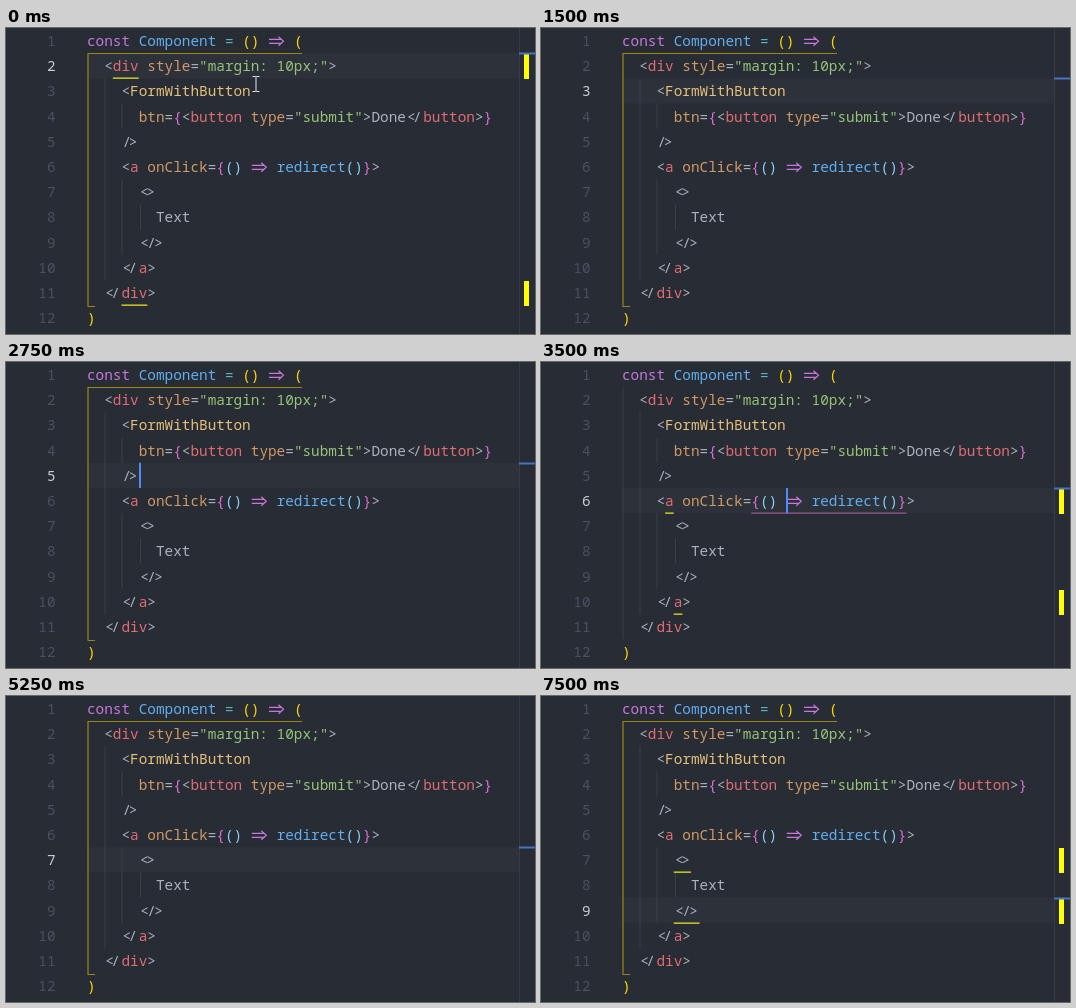
An HTML page for the animation above (8 s loop, 529 by 306 pixels).

```html
<!DOCTYPE html>
<html lang="en">
<head>
<meta charset="utf-8">
<title>Matching tags in a code editor</title>
<style>
  html, body { margin: 0; width: 100%; height: 100%; overflow: hidden; background: #282c34; }
  svg { display: block; }
  text { font-family: "Noto Sans Mono", "DejaVu Sans Mono", monospace; font-size: 14.37px; white-space: pre; }
  .num { fill: #495162; text-anchor: end; }
  .num.on { fill: #c8ccd4; }
</style>
</head>
<body>
<svg width="529" height="306" viewBox="0 0 529 306">
  <rect width="529" height="306" fill="#282c34"/>
  <g id="under"></g>
  <g id="code"></g>
  <g id="over"></g>
</svg>
<script>
const LEFT = 81, CHAR = 8.62, ROW = 25.2, LOOP = 8000;
const colX = col => LEFT + col * CHAR;
const top_ = line => (line - 1) * ROW;
const layer = id => document.getElementById(id);

const COLORS = {
  k: '#c678dd', f: '#61afef', o: '#56b6c2', t: '#e06c75', a: '#d19a66',
  s: '#98c379', c: '#e5c07b', p: '#abb2bf', 1: '#ffd700', 2: '#da70d6', 3: '#87cefa'
};

// Each line: indent, then tokens written as colour key + text.
const LINES = [
  [0, 'kconst', 'p ', 'fComponent', 'p ', 'o=', 'p ', '1()', 'p ', 'k=>', 'p ', '1('],
  [2, 'p<', 'tdiv', 'p ', 'astyle', 'p=', 's"margin: 10px;"', 'p>'],
  [4, 'p<', 'cFormWithButton'],
  [6, 'abtn', 'p=', '2{', 'p<', 'tbutton', 'p ', 'atype', 'p=', 's"submit"', 'p>',
    'pDone', 'p</', 'tbutton', 'p>', '2}'],
  [4, 'p/>'],
  [4, 'p<', 'ta', 'p ', 'aonClick', 'p=', '2{', '3()', 'p ', 'k=>', 'p ', 'fredirect', '3()', '2}', 'p>'],
  [6, 'p<>'],
  [8, 'pText'],
  [6, 'p</>'],
  [4, 'p</', 'ta', 'p>'],
  [2, 'p</', 'tdiv', 'p>'],
  [0, '1)']
];

// Glyph shifts that imitate the font's ligatures.
const LIGATURES = { '</': [1, -1.6], '<>': [1.2, -1.2], '/>': [1, -1.4], '</>': [1.6, 0, -1.6] };

// Indent guides: column, first line, last line.
const GUIDES = [[0, 2, 11], [2, 3, 10], [4, 4, 4], [4, 7, 9], [6, 8, 8]];

// Matched tags (line, column, length) and the inner bracket pair around the caret.
const FRAGMENT = { tags: [[7, 6, 2], [9, 6, 3]] };
const MATCHES = {
  '2:19': { tags: [[2, 3, 3], [11, 4, 3]] },
  '4:19': { tags: [[4, 12, 6], [4, 39, 6]], pair: [4, 10, 37] },
  '6:19': { tags: [[6, 5, 1], [10, 6, 1]], pair: [6, 15, 18] },
  '7:7': FRAGMENT,
  '9:7': FRAGMENT
};

// Start time, line, column, caret shown, pointer position.
const STEPS = [
  [0, 2, 19, 0, [250, 56]], [250, 2, 19, 0, [245, 40]], [750, 2, 19, 1, [316, 137]],
  [1000, 3, 19, 1], [1500, 3, 19, 0],
  [2000, 4, 19, 1], [2500, 4, 19, 0],
  [2750, 5, 6, 1], [3250, 5, 6, 0],
  [3500, 6, 19, 1], [4000, 6, 19, 0], [4500, 6, 19, 1],
  [4750, 7, 8, 1], [5250, 7, 8, 0],
  [5500, 7, 7, 1], [6000, 7, 7, 0],
  [6250, 8, 7, 1], [6750, 8, 7, 0],
  [7250, 9, 7, 1], [7500, 9, 7, 0]
];

const rect = (x, y, w, h, fill) =>
  `<rect x="${x}" y="${y}" width="${w}" height="${h}" fill="${fill}"/>`;
const stroke = (d, color, width = 1) =>
  `<path d="${d}" fill="none" stroke="${color}" stroke-width="${width}"/>`;
const escape_ = s => s.replace(/</g, '&lt;').replace(/>/g, '&gt;');
const underline = ([line, col, len], color) =>
  rect(colX(col), Math.round(top_(line + 1)) - 0.5, len * CHAR, 1.3, color);

function arrow(x, y, color) {
  return stroke(`M${x + 1} ${y - 2}h12.5M${x + 1} ${y + 2}h12.5M${x + 10.5} ${y - 4.5}l5 4.5l-5 4.5`, color, 1.2);
}

function token(text, color, col, line) {
  const y = top_(line) + 17.9;
  if (text === '=>') return arrow(colX(col), y - 4.6, color);
  const shifts = LIGATURES[text] || [0];
  const xs = shifts.map((dx, i) => (colX(col + i) + dx).toFixed(2)).join(' ');
  return `<text x="${xs}" y="${y}" fill="${color}">${escape_(text)}</text>`;
}

function codeMarkup() {
  return LINES.map(([indent, ...tokens], i) => {
    let col = indent;
    let out = `<text class="num" x="49.6" y="${top_(i + 1) + 17.9}">${i + 1}</text>`;
    for (const t of tokens) {
      const text = t.slice(1);
      if (text.trim()) out += token(text, COLORS[t[0]], col, i + 1);
      col += text.length;
    }
    return out;
  }).join('');
}

function underMarkup(line, pair) {
  let out = rect(LEFT, top_(line), 432, ROW, '#2c313a');
  for (const [col, from, to] of GUIDES) {
    out += rect(Math.round(colX(col)) + (col < 6 ? 0.5 : 1), top_(from), 1, top_(to + 1) - top_(from), '#3b4048');
  }
  out += pair ? underline(pair, '#98548f') : stroke('M296 25.5H82V278.5H89', '#9c8712', 1.1);
  return out + rect(513, 0, 1, 306, '#363b45');
}

function overMarkup(line, col, caret, pointer, tags) {
  let out = tags.map(t => underline(t, '#e8e020')).join('');
  for (const row of new Set(tags.map(t => t[0]))) {
    out += rect(518, Math.round(top_(row)) + 1, 5, 25, '#ffff00');
  }
  out += rect(513, Math.round(top_(line)) - 0.5, 16, 2, '#4673c2');
  if (caret) out += rect(Math.round(colX(col)), top_(line), 2, ROW, '#528bff');
  if (pointer) {
    const [x, y] = pointer;
    out += stroke(`M${x - 3.5} ${y - 7.5}h3l.5 .5l.5-.5h3M${x} ${y - 7}v14M${x - 3.5} ${y + 7.5}h3l.5-.5l.5 .5h3`, '#e4e6ea');
  }
  return out;
}

layer('code').innerHTML = codeMarkup();
const numbers = document.querySelectorAll('.num');
let shown = null;

function draw(now) {
  const time = now % LOOP;
  const step = STEPS.findLast(s => s[0] <= time);
  if (step !== shown) {
    shown = step;
    const [, line, col, caret, pointer] = step;
    const { tags = [], pair } = MATCHES[`${line}:${col}`] || {};
    layer('under').innerHTML = underMarkup(line, pair);
    layer('over').innerHTML = overMarkup(line, col, caret, pointer, tags);
    numbers.forEach((n, i) => n.classList.toggle('on', i + 1 === line));
  }
}

const start = performance.now();
function tick() {
  draw(performance.now() - start);
  requestAnimationFrame(tick);
}
tick();
</script>
</body>
</html>
```
